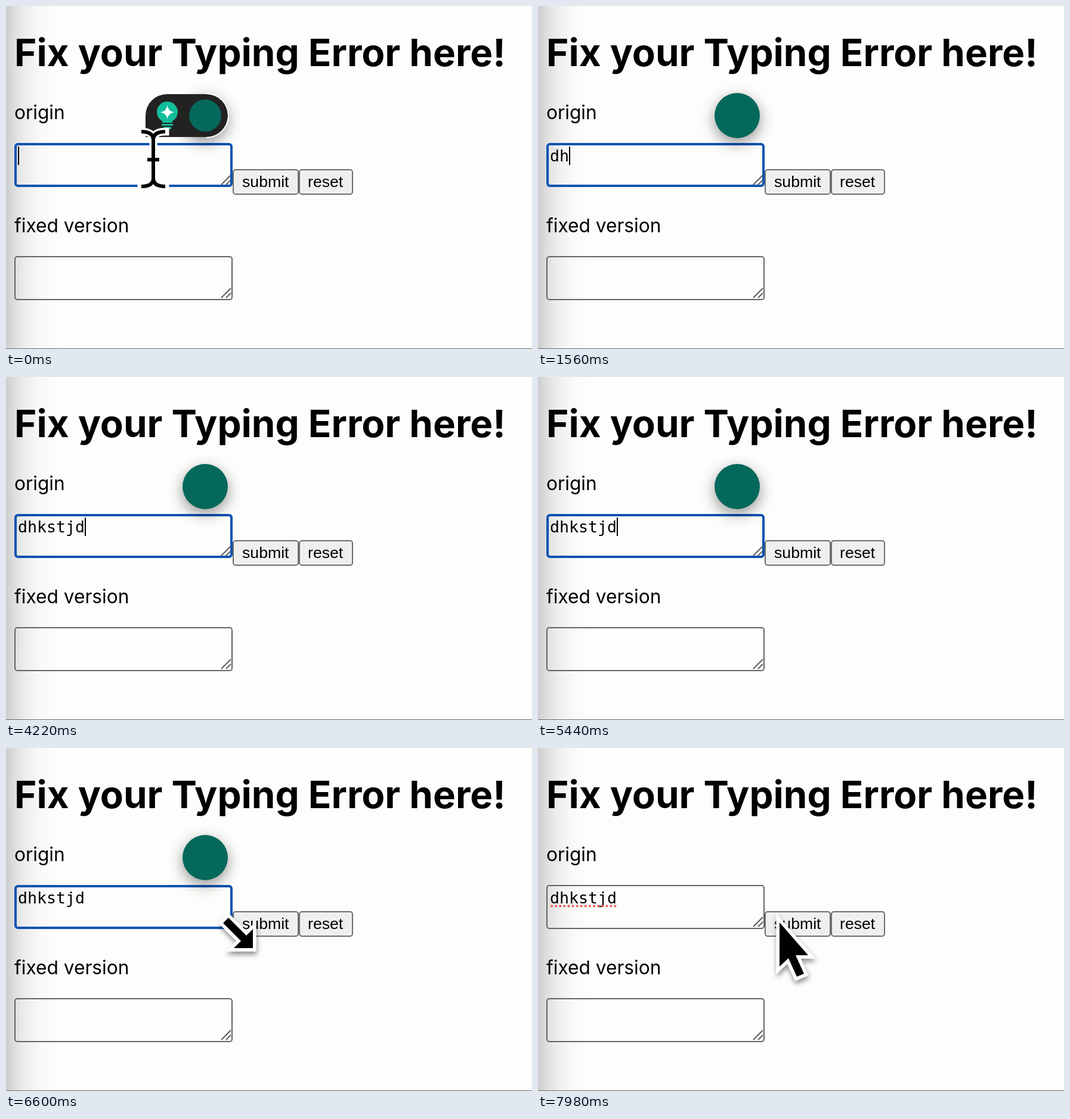
Animation of 882 by 576 pixels, one loop 8 s. Source, as an HTML page:

```html
<!DOCTYPE html>
<html lang="en">
<head>
<meta charset="utf-8">
<title>Typing fixer</title>
<style>
  html, body { margin: 0; width: 100%; height: 100%; overflow: hidden; background: #fdfdfc; }
  svg { display: block; width: 882px; height: 576px; }
  text { white-space: pre; }
  .heading { font: 700 63.700px Inter, sans-serif; }
  .label { font: 31.700px Inter, sans-serif; }
  .button text { font: 26.667px "Liberation Sans", Arial, sans-serif; }
  .button rect { fill: #efefee; stroke: #6d6d6c; stroke-width: 2; }
  .typed { font: 26.600px "DejaVu Sans Mono", monospace; }
  .field { fill: none; stroke: #646464; stroke-width: 2; }
  .field.focused { stroke: #0a53b4; stroke-width: 4; }
  .grip { stroke: #5c5c5c; stroke-width: 2; }
  .solid { fill: #000; stroke: #fff; stroke-width: 11; paint-order: stroke; stroke-linejoin: miter; }
  .beam { fill: none; stroke: #000; stroke-width: 6; }
  .beam.halo { stroke: #fff; stroke-width: 13; stroke-linecap: square; }
</style>
</head>
<body>
<svg viewBox="0 0 882 576">
  <defs>
    <linearGradient id="edge">
      <stop offset="0" stop-color="#cdcdcd"/>
      <stop offset=".17" stop-color="#dedede"/>
      <stop offset=".36" stop-color="#ececec"/>
      <stop offset=".65" stop-color="#f8f8f8"/>
      <stop offset="1" stop-color="#fdfdfc"/>
    </linearGradient>
    <filter id="glow" x="-50%" y="-50%" width="200%" height="200%"><feGaussianBlur stdDeviation="12"/></filter>
    <filter id="shadow" x="-50%" y="-50%" width="200%" height="200%">
      <feDropShadow dx="1" dy="5" stdDeviation="4" flood-color="#000" flood-opacity=".45"/>
    </filter>
    <path id="beamShape" d="M-20-47Q0-47 0-33Q0-47 20-47M0-34V33M-20 45Q0 45 0 31Q0 45 20 45M-10 0H10"/>
    <path id="gripShape" class="grip" d="M361 300L377 284M369 300L377 292"/>
  </defs>

  <rect width="882" height="576" fill="#fdfdfc"/>
  <rect width="85" height="576" fill="url(#edge)"/>
  <rect y="575" width="882" height="1" fill="#666"/>

  <text class="heading" x="14" y="100.500">Fix your Typing Error here!</text>
  <text class="label" x="14" y="190">origin</text>
  <text class="label" x="14" y="380">fixed version</text>

  <rect id="origin" class="field" rx="4"/>
  <use href="#gripShape"/>
  <rect class="field" x="15" y="421" width="364" height="72" rx="4"/>
  <use href="#gripShape" y="190"/>

  <g class="button">
    <rect x="381" y="275" width="109" height="41" rx="4"/>
    <text x="396" y="304">submit</text>
    <rect x="492" y="275" width="89" height="41" rx="4"/>
    <text x="506" y="304">reset</text>
  </g>

  <text id="typed" class="typed" x="20" y="261"></text>
  <rect id="caret" y="236" width="2" height="31"/>
  <path id="misspelled" d="M23 265.500H132" stroke="#f0564a" stroke-width="4" stroke-linecap="round" stroke-dasharray="0 7.100"/>

  <g id="badge">
    <g id="badgeGlow" filter="url(#glow)">
      <circle cx="334" cy="192" r="38" opacity=".42"/>
    </g>
    <g id="pill">
      <path d="M234 220V184A36 36 0 0 1 270 148H336A36 36 0 0 1 336 220Z" fill="#222"/>
      <path d="M336 147A37 37 0 0 1 336 221" fill="none" stroke="#fff" stroke-width="2"/>
      <circle cx="270.500" cy="178" r="17.500" fill="#12bd9b"/>
      <path d="M262 190H279V196H262ZM261 198H280V201H261ZM264 203H277V207H264Z" fill="#12bd9b"/>
      <path d="M270.500 167Q272 177 282 178.500Q272 180 270.500 190Q269 180 259 178.500Q269 177 270.500 167Z" fill="#fff"/>
    </g>
    <circle id="mark" cx="334" cy="184" fill="#04685b"/>
  </g>

  <g id="cursor">
    <g id="beam">
      <use href="#beamShape" class="beam halo"/>
      <use href="#beamShape" class="beam"/>
    </g>
    <g id="resize" filter="url(#shadow)">
      <path class="solid" d="M1-9L31 21L42 10V42H10L22 30L-8 0Z"/>
    </g>
    <g id="arrow" filter="url(#shadow)">
      <path class="solid" d="M5 11V85L20 71L34 102L46 97L32 66H53Z"/>
    </g>
  </g>
</svg>
<script>
const LOOP = 8000;
const WORD = "dhkstjd";
const CHAR_WIDTH = 16;
const FIRST_KEY = 520;
const KEY_STEP = 590;
const CLICK = 7740;
const POINTER_BACK = 5680;
const $ = id => document.getElementById(id);
const show = (id, on) => $(id).setAttribute("visibility", on ? "visible" : "hidden");
const set = (id, attrs) => {
  for (const name in attrs) $(id).setAttribute(name, attrs[name]);
};

// Eased value along [time, value] points.
function track(points, t) {
  const next = points.findIndex(p => p[0] > t);
  if (next < 0) return points[points.length - 1][1];
  if (next === 0) return points[0][1];
  const [t0, a] = points[next - 1], [t1, b] = points[next];
  const u = (t - t0) / (t1 - t0);
  return a + (b - a) * u * u * (3 - 2 * u);
}

const cursorX = [[POINTER_BACK, 247], [5890, 309], [6400, 372], [6700, 372], [7060, 400]];
const cursorY = [[POINTER_BACK, 258], [5890, 284], [6400, 294], [6700, 294], [7060, 282]];
const pillOpacity = [[440, 1], [575, .13], [680, 0]];
const markRadius = [[440, 27], [575, 35], [680, 35], [780, 38]];
const glowOpacity = [[440, 1], [575, 0], [680, 0], [780, 1]];

function cursorKind(t) {
  if (t >= FIRST_KEY && t < POINTER_BACK) return "none";
  return t < 6300 ? "beam" : t < 6790 ? "resize" : "arrow";
}

function draw(t) {
  const count = Math.max(0, Math.min(WORD.length, Math.floor((t - FIRST_KEY) / KEY_STEP) + 1));
  const lastKey = count ? FIRST_KEY + (count - 1) * KEY_STEP : 0;
  const focused = t < CLICK;

  $("typed").textContent = WORD.slice(0, count);
  set("caret", { x: 20 + count * CHAR_WIDTH });
  show("caret", focused && (t - lastKey) % 1000 < 500);
  show("misspelled", !focused);
  set("origin", focused
    ? { class: "field focused", x: 16, y: 232, width: 362, height: 70 }
    : { class: "field", x: 15, y: 231, width: 364, height: 72 });

  show("badge", focused);
  set("pill", { opacity: track(pillOpacity, t) });
  set("badgeGlow", { opacity: track(glowOpacity, t) });
  set("mark", { r: track(markRadius, t) });

  const kind = cursorKind(t);
  for (const id of ["beam", "resize", "arrow"]) show(id, id === kind);
  set("cursor", { transform: `translate(${track(cursorX, t)} ${track(cursorY, t)})` });
}

const start = performance.now();
function tick() {
  draw((performance.now() - start) % LOOP);
  requestAnimationFrame(tick);
}
tick();
</script>
</body>
</html>
```
